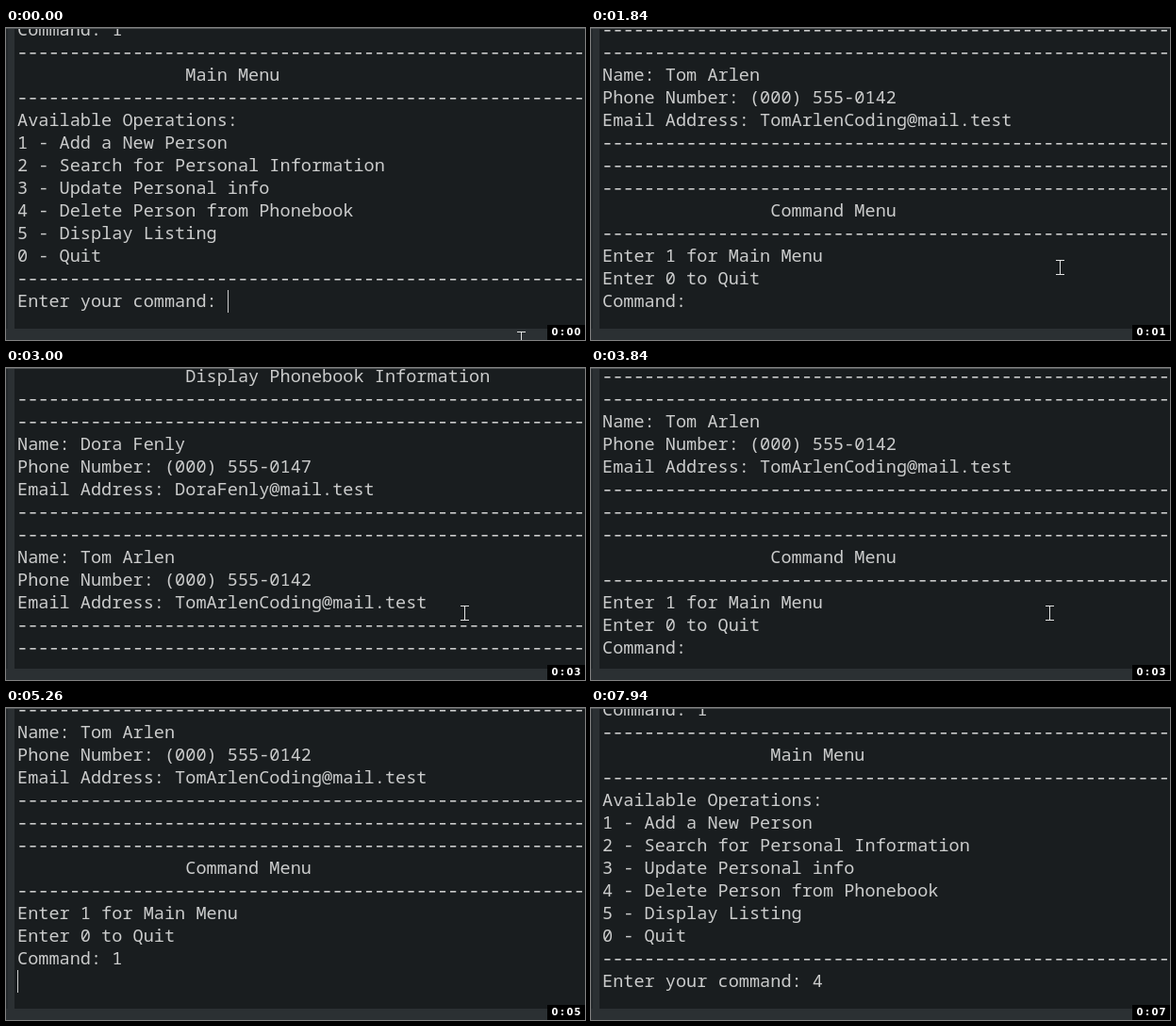
An HTML page with a canvas for the animation above (8 s loop, 614 by 331 pixels).

```html
<!DOCTYPE html>
<html lang="en">
<head>
<meta charset="utf-8">
<title>Phonebook console</title>
<style>
html, body { margin: 0; width: 100%; height: 100%; overflow: hidden; background: #191d1f; }
canvas { display: block; }
</style>
</head>
<body>
<canvas id="stage" width="614" height="331"></canvas>
<script>
const ctx = document.getElementById("stage").getContext("2d");
const LOOP = 8000, LEFT = 12, CELL = 11.14, ROW = 24, BASE = 296;
const INK = "#cbcccc", PANEL = "#2b3033";
const RULE = "---";

const center = text => " ".repeat(16) + text;
const person = (name, phone, email) =>
  ["Name: " + name, "Phone Number: " + phone, "Email Address: " + email, RULE, RULE];

const menu = answer => [
  RULE, "Command: 1", RULE, center("Main Menu"), RULE,
  "Available Operations:",
  "1 - Add a New Person",
  "2 - Search for Personal Information",
  "3 - Update Personal info",
  "4 - Delete Person from Phonebook",
  "5 - Display Listing",
  "0 - Quit",
  RULE, "Enter your command: " + answer
];

const listing = answer => [
  RULE, center("Display Phonebook Information"), RULE, RULE,
  ...person("Dora Fenly", "(000) 555-0147", "DoraFenly@mail.test"),
  ...person("Tom Arlen", "(000) 555-0142", "TomArlenCoding@mail.test"),
  RULE, center("Command Menu"), RULE,
  "Enter 1 for Main Menu",
  "Enter 0 to Quit",
  "Command: " + answer
];

// Each step changes only the listed properties; caret is [column, rows above the last].
const steps = [
  { t: 0, lines: menu(""), shift: 0, caret: [20, 0], pointer: [546, 330] },
  { t: 270, lines: menu("5"), caret: [21, 0], pointer: null },
  { t: 670, lines: [...menu("5"), ""], caret: [0, 0] },
  { t: 790, lines: listing(""), caret: null },
  { t: 1840, pointer: [497, 254] },
  { t: 1940, pointer: [490, 257] },
  { t: 2060, pointer: [486, 259] },
  { t: 2210, shift: 50 },
  { t: 2330, shift: 110 },
  { t: 2450, shift: 151 },
  { t: 2600, pointer: [486, 260] },
  { t: 3840, shift: 7 },
  { t: 4400, pointer: [493, 298] },
  { t: 4710, lines: listing("1"), shift: 0, caret: [10, 0], pointer: null },
  { t: 4840, pointer: [508, 322] },
  { t: 5260, lines: [...listing("1"), ""], caret: [0, 0], pointer: null },
  { t: 5410, lines: menu(""), caret: [0, 11], pointer: [508, 322] },
  { t: 5970, caret: null },
  { t: 6470, caret: [0, 11] },
  { t: 7030, caret: null },
  { t: 7410, lines: menu("4"), caret: [21, 0], pointer: null },
  { t: 7940, caret: null }
];
const ticks = [940, 2060, 3000, 3970, 4980, 6070, 7130];

function box(color, x, y, w, h) {
  ctx.fillStyle = color;
  ctx.fillRect(x, y, w, h);
}

function drawRule(y) {
  for (let i = 0; i < 54; i++) box(INK, LEFT + i * CELL + 2.3, y - 6, 6.2, 1.6);
}

function drawLine(text, y) {
  if (text === RULE) return drawRule(y);
  ctx.fillStyle = INK;
  [...text].forEach((ch, i) => {
    if (ch !== " ") ctx.fillText(ch, LEFT + i * CELL, y);
  });
}

function drawConsole({ lines, shift, caret }) {
  ctx.save();
  ctx.beginPath();
  ctx.rect(9, 1, 605, 318);
  ctx.clip();
  ctx.font = '18.55px "Noto Sans Mono", "DejaVu Sans Mono", monospace';
  ctx.textAlign = "left";
  lines.forEach((text, i) => {
    const y = BASE + shift - (lines.length - 1 - i) * ROW;
    if (y > -8 && y < 340) drawLine(text, y);
  });
  if (caret) {
    const [col, up] = caret;
    box(INK, Math.ceil(LEFT + col * CELL), BASE + shift - up * ROW - 18, 1, 24);
  }
  ctx.restore();
}

function drawPointer([x, y]) {
  const color = "#e2e3e3";
  box(color, x, y - 8, 1, 16);
  box(color, x - 4, y - 8, 9, 1);
  box(color, x - 4, y + 7, 9, 1);
}

function drawClock(t) {
  const seconds = ticks.filter(at => at <= t).length;
  box("#000", 574, 315, 40, 16);
  ctx.fillStyle = "#fff";
  ctx.font = 'bold 10px "DejaVu Sans", sans-serif';
  ctx.textAlign = "center";
  [..."0:0" + seconds].forEach((ch, i) => ctx.fillText(ch, 582 + i * 8, 326));
}

function draw(t) {
  const state = Object.assign({}, ...steps.filter(s => s.t <= t));
  box("#191d1f", 0, 0, 614, 331);
  box(PANEL, 0, 0, 9, 331);
  box("#23282b", 0, 0, 2, 319);
  box(PANEL, 0, 319, 614, 12);
  box("#505456", 0, 0, 614, 1);
  drawConsole(state);
  if (state.pointer) drawPointer(state.pointer);
  drawClock(t);
}

const start = performance.now();
function frame() {
  draw((performance.now() - start) % LOOP);
  requestAnimationFrame(frame);
}
frame();
</script>
</body>
</html>
```
